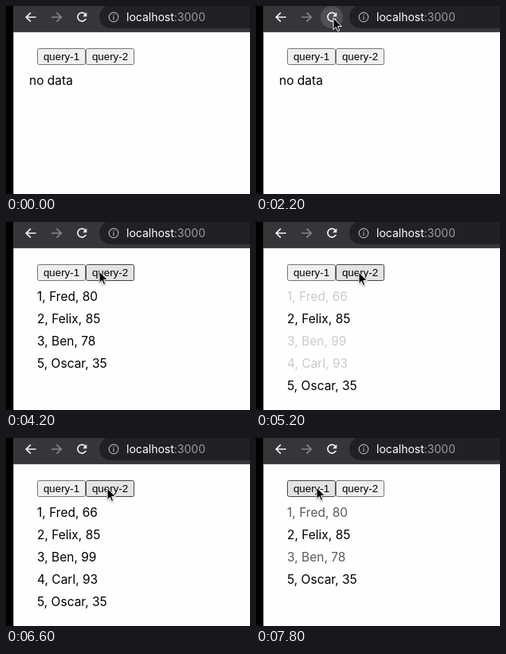
Write an HTML page that moves like this. It is 306 px wide and 236 px high and loops after 8000 ms.

```html
<!DOCTYPE html>
<html lang="en">
<head>
<meta charset="utf-8">
<title>Query list</title>
<style>
  html, body { margin: 0; width: 100%; height: 100%; overflow: hidden; background: #fefefe; }
  svg { display: block; width: 306px; height: 236px; }
  .anim { animation: 8s linear infinite both; }

  .url { font: 14px Inter, Roboto, sans-serif; fill: #fff; }
  .port { fill: #9a9ca0; }
  .page { font: 15.5px Inter, Roboto, sans-serif; fill: #000; }
  .btn text { font: 13.333px "Liberation Sans", Arial, sans-serif; text-anchor: middle; }
  .btn rect { fill: #efefef; stroke: #767676; }
  .icon { fill: none; stroke: #f1f1f2; stroke-width: 1.7; }
  .dim { stroke: #85868a; }

  .empty { animation-name: empty; }
  .kept { animation-name: kept; }
  .first { animation-name: first; }
  .second { animation-name: second; }
  .last { animation-name: kept, shift; }
  .halo { animation-name: halo; }
  .q1 rect { animation-name: hover1; }
  .q2 rect { animation-name: hover2; }
  .cursor { animation-name: move; filter: drop-shadow(0 1px 1px #0005); }

  /* queries answer at 3050, 5000 and 7150 ms; changed rows fade in for 1 s */
  @keyframes empty {
    0%, 38.12% { opacity: 1; }
    38.13%, 100% { opacity: 0; }
  }
  @keyframes kept {
    0%, 38.12% { opacity: 0; }
    50.62%, 100% { opacity: 1; }
  }
  @keyframes first {
    0%, 38.12% { opacity: 0; }
    50.62%, 62.49% { opacity: 1; }
    62.5%, 89.37% { opacity: 0; }
    100% { opacity: .85; }
  }
  @keyframes second {
    0%, 62.5% { opacity: 0; }
    75%, 89.37% { opacity: 1; }
    89.38%, 100% { opacity: 0; }
  }
  @keyframes shift {
    0%, 62.49% { transform: translateY(0); }
    62.5%, 89.37% { transform: translateY(28px); }
    89.38%, 100% { transform: translateY(0); }
  }
  @keyframes halo {
    0%, 16.5% { opacity: 0; }
    18%, 31% { opacity: 1; }
    33%, 100% { opacity: 0; }
  }
  @keyframes hover1 {
    0%, 35% { fill: #efefef; stroke: #767676; }
    35.01%, 49% { fill: #e3e3e3; stroke: #444; }
    49.01%, 86% { fill: #efefef; stroke: #767676; }
    86.01%, 100% { fill: #e3e3e3; stroke: #444; }
  }
  @keyframes hover2 {
    0%, 49% { fill: #efefef; stroke: #767676; }
    49.01%, 86% { fill: #e3e3e3; stroke: #444; }
    86.01%, 100% { fill: #efefef; stroke: #767676; }
  }
  @keyframes move {
    0%, 9.99% { transform: translate(40px, 214px); opacity: 0; }
    10% { transform: translate(40px, 214px); opacity: 1; }
    12.5% { transform: translate(67px, 130px); }
    15% { transform: translate(87px, 55px); }
    17.5%, 28.5% { transform: translate(97px, 15px); animation-timing-function: ease-in-out; }
    36.5%, 46% { transform: translate(81px, 63px); animation-timing-function: ease-in-out; }
    52.5% { transform: translate(117px, 62px); animation-timing-function: ease-out; }
    57.5%, 72% { transform: translate(129px, 63px); }
    80%, 83.5% { transform: translate(127px, 63px); animation-timing-function: ease-in-out; }
    88.5%, 100% { transform: translate(76px, 62px); opacity: 1; }
  }
</style>
</head>
<body>
<svg viewBox="0 0 306 236">
  <rect width="306" height="236" fill="#fefefe"/>
  <rect width="9.3" height="236" fill="#000"/>
  <rect x="9" width="297" height="32" fill="#36363a"/>
  <rect x="9" y="32" width="297" height="1" fill="#51484d"/>
  <rect x="117" y="-1" width="220" height="29" rx="14.5" fill="#202124"/>

  <circle class="anim halo" cx="95" cy="14" r="14" fill="#505155"/>
  <path class="icon" d="M37.5 14H25.5M31 8.3L25.3 14L31 19.7"/>
  <path class="icon dim" d="M57 14H69M63.5 8.3L69.2 14L63.5 19.7"/>
  <path class="icon" d="M99.6 10.4A5.4 5.4 0 1 0 100.2 16"/>
  <path d="M101.3 8V13.3H96Z" fill="#f1f1f2"/>
  <g fill="none" stroke="#a2a4a8" stroke-width="1.3">
    <circle cx="135" cy="14" r="5.8"/>
    <path d="M135 13V17.3M135 10.5V11.9"/>
  </g>
  <text class="url" x="151" y="19">localhost<tspan class="port">:3000</tspan></text>

  <g class="btn q1">
    <rect class="anim" x="39.5" y="53.5" width="60" height="20" rx="2"/>
    <text x="69.5" y="68">query-1</text>
  </g>
  <g class="btn q2">
    <rect class="anim" x="100.5" y="53.5" width="60" height="20" rx="2"/>
    <text x="130.5" y="68">query-2</text>
  </g>

  <g class="page">
    <text class="anim empty" x="29" y="99">no data</text>
    <text class="anim first" x="39" y="99">1, Fred, 80</text>
    <text class="anim second" x="39" y="99">1, Fred, 66</text>
    <text class="anim kept" x="39" y="127">2, Felix, 85</text>
    <text class="anim first" x="39" y="155">3, Ben, 78</text>
    <text class="anim second" x="39" y="155">3, Ben, 99</text>
    <text class="anim second" x="39" y="183">4, Carl, 93</text>
    <text class="anim last" x="39" y="183">5, Oscar, 35</text>
  </g>

  <path class="anim cursor" d="M0 0V14.6L3.3 11.5L5.5 16.6L7.7 15.6L5.6 10.6H10.3Z" fill="#000" stroke="#fff" stroke-linejoin="round"/>
</svg>
</body>
</html>
```
